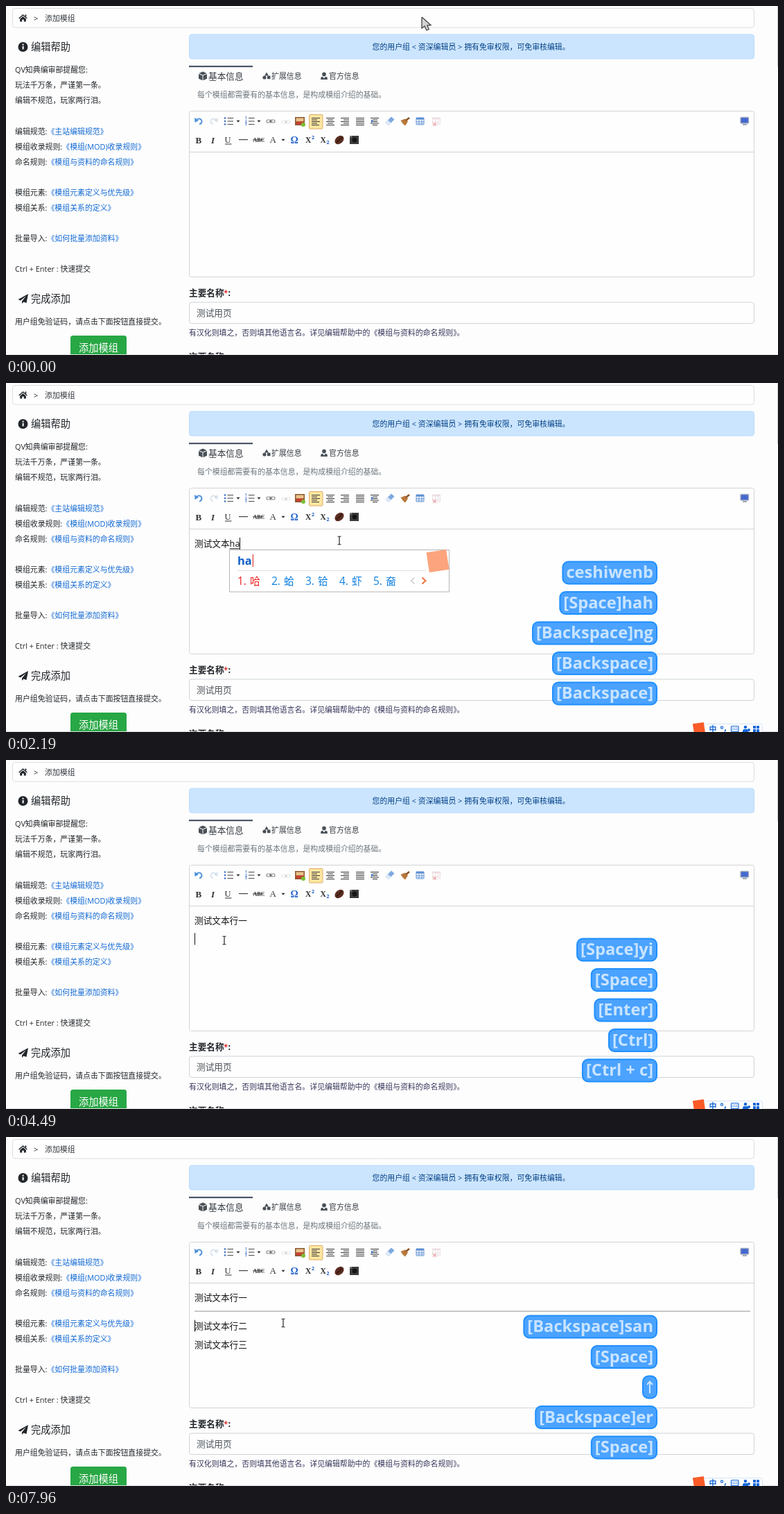
Recreate the animation shown at these times as an HTML page with a canvas. Size 1114 by 503 pixels, loop 8 s.

```html
<!DOCTYPE html>
<html lang="zh-CN">
<head>
<meta charset="utf-8">
<title>添加模组</title>
<style>
html, body { margin: 0; width: 100%; height: 100%; overflow: hidden; background: #fdfdfd; }
canvas { display: block; width: 1114px; height: 503px; }
</style>
</head>
<body>
<canvas id="stage"></canvas>
<script>
const W = 1114, H = 503, LOOP = 8000;
const canvas = document.getElementById('stage');
const g = canvas.getContext('2d');
const dpr = window.devicePixelRatio || 1;
canvas.width = W * dpr;
canvas.height = H * dpr;

const UI = '"Open Sans", "Noto Sans CJK SC", "Noto Sans CJK", sans-serif';
const SERIF = '"Liberation Serif", "Noto Serif", serif';
const MONO = '"Liberation Mono", "DejaVu Sans Mono", monospace';
const SMALL = 10.9, BODY = 12.67, HEAD = 14.25;
const INK = '#212529', LINK = '#1068d4';

/* ---------- drawing helpers ---------- */

// y is the middle of the ideographs
function text(s, x, y, size = SMALL, color = INK, weight = 400, family = UI) {
  g.font = `${weight} ${size}px ${family}`;
  g.fillStyle = color;
  g.fillText(s, x, y + size * 0.38);
  return x + g.measureText(s).width;
}
function box(x, y, w, h, r, fill, stroke, lw = 1) {
  g.beginPath();
  g.roundRect(x, y, w, h, r);
  if (fill) { g.fillStyle = fill; g.fill(); }
  if (stroke) { g.strokeStyle = stroke; g.lineWidth = lw; g.stroke(); }
}
function rect(x, y, w, h, color) {
  g.fillStyle = color;
  g.fillRect(x, y, w, h);
}
function disc(x, y, r, color) {
  g.fillStyle = color;
  g.beginPath();
  g.arc(x, y, r, 0, Math.PI * 2);
  g.fill();
}
function trace(pts, close) {
  g.beginPath();
  for (let i = 0; i < pts.length; i += 2) g.lineTo(pts[i], pts[i + 1]);
  if (close) g.closePath();
}
function poly(x, y, pts, color) {
  trace(pts.map((v, i) => v + (i % 2 ? y : x)), true);
  g.fillStyle = color;
  g.fill();
}
function line(x, y, pts, color, lw = 1) {
  trace(pts.map((v, i) => v + (i % 2 ? y : x)));
  g.strokeStyle = color;
  g.lineWidth = lw;
  g.stroke();
}
function tilted(x, y, size, angle, color) {
  g.save();
  g.translate(x, y);
  g.rotate(angle);
  rect(-size / 2, -size / 2, size, size, color);
  g.restore();
}
function faded(alpha, draw) {
  g.globalAlpha = alpha;
  draw();
  g.globalAlpha = 1;
}

/* ---------- static page ---------- */

function sidebar() {
  disc(24.5, 59, 7, INK);
  rect(23.6, 57.8, 2, 4.6, '#fff');
  rect(23.6, 54.6, 2, 2, '#fff');
  text('编辑帮助', 36, 59, HEAD);
  const rows = [
    ['QV知典编审部提醒您:'], ['玩法千万条，严谨第一条。'], ['编辑不规范，玩家两行泪。'], [],
    ['编辑规范:', '《主站编辑规范》'], ['模组收录规则:', '《模组(MOD)收录规则》'],
    ['命名规则:', '《模组与资料的命名规则》'], [],
    ['模组元素:', '《模组元素定义与优先级》'], ['模组关系:', '《模组关系的定义》'], [],
    ['批量导入:', '《如何批量添加资料》'], [], ['Ctrl + Enter : 快速提交']
  ];
  rows.forEach(([label, link], i) => {
    if (!label) return;
    const y = 92 + i * 22.1, end = text(label, 13, y);
    if (link) text(link, end, y, SMALL, LINK);
  });
  poly(25, 422, [7, -7, -7.5, 1, -4, 2.6, 4, -4, -2, 3.6, -2, 7, 0.4, 4.5, 4.5, 6], INK);
  text('完成添加', 36, 422, HEAD);
  text('用户组免验证码，请点击下面按钮直接提交。', 13, 455);
  box(93, 475, 81, 34, 3.5, '#28a745');
  text('添加模组', 105, 493, HEAD, '#fff');
}

function header() {
  box(9.5, 3.5, 1070, 27.5, 3.5, '#fefefe', '#dcdee0');
  poly(24.5, 17.5, [0, -5.5, 6.3, 0, 5.3, 1, 0, -3.8, -5.3, 1, -6.3, 0], INK);
  poly(24.5, 17.5, [0, -2.6, 4.3, 1.2, 4.3, 5, 1.3, 5, 1.3, 2, -1.3, 2, -1.3, 5, -4.3, 5, -4.3, 1.2], INK);
  rect(27.6, 12.4, 1.7, 3, INK);
  text('>', 40, 17.5);
  text('添加模组', 56, 17.5, SMALL, '#343a40');
  box(264.5, 41, 815, 35, 3.5, '#cce5ff', '#b8daff');
  text('您的用户组 < 资深编辑员 > 拥有免审权限，可免审核编辑。', 528.5, 58.5, SMALL, '#004085');
}

function tabs() {
  const c = '#495057';
  rect(264, 86, 92, 2.2, '#4a5568');
  poly(284, 101, [0, -6.5, 5.6, -4, 0, -1.6, -5.6, -4], c);
  poly(284, 101, [-6, -3, -0.5, -0.7, -0.5, 6.3, -6, 3.8], c);
  poly(284, 101, [6, -3, 0.5, -0.7, 0.5, 6.3, 6, 3.8], c);
  text('基本信息', 292, 101, BODY, '#343a40');
  poly(376, 101, [0, -5.5, 3, -0.5, -3, -0.5], c);
  disc(373, 103, 2.6, c);
  rect(377, 100.6, 4.5, 4.6, c);
  text('扩展信息', 383, 101, SMALL, '#343a40');
  disc(459, 98.4, 2.8, c);
  poly(459, 101, [-5, 5, -4.4, 1.6, -2, 0.8, 0, 3.6, 2, 0.8, 4.4, 1.6, 5, 5], c);
  text('官方信息', 466, 101, SMALL, '#343a40');
  text('每个模组都需要有的基本信息，是构成模组介绍的基础。', 276, 128, SMALL, '#6c757d');
}

function form() {
  text('主要名称', 264, 413, BODY, INK, 700);
  text('*', 314.5, 413, 10, '#e02b2b', 700);
  text(':', 320.5, 413, BODY, INK, 700);
  box(264.5, 427, 815, 30.5, 3.5, '#fefefe', '#ced4da');
  text('测试用页', 275, 442, BODY, '#495057');
  text('有汉化则填之，否则填其他语言名。详见编辑帮助中的《模组与资料的命名规则》。', 264, 471, SMALL, '#34345a');
  text('次要名称:', 264, 505, BODY, INK, 700);
}

/* ---------- toolbar ---------- */

function bars(x, y, widths, align, color = '#444') {
  widths.forEach((w, i) => rect(x - 6 + (12 - w) * align, y - 5 + i * 2.5, w, 1.1, color));
}
function drop(x, y) { poly(x, y, [-2.6, -1.2, 2.6, -1.2, 0, 1.8], '#333'); }

function curl(x, y, flip, color) {
  g.save();
  g.translate(x, y);
  g.scale(flip, 1);
  g.strokeStyle = color;
  g.lineWidth = 2;
  g.beginPath();
  g.arc(0.5, 0.5, 4, Math.PI * 1.15, Math.PI * 2.45);
  g.stroke();
  poly(0, 0, [-6, -5, -5.4, 2, 0, -1], color);
  g.restore();
}
function chain(x, y) {
  box(x - 6, y - 2, 6.5, 4, 2, null, '#8a8a8a', 1.2);
  box(x - 0.5, y - 2, 6.5, 4, 2, null, '#8a8a8a', 1.2);
  rect(x - 2.5, y - 0.5, 5, 1, '#555');
}
function grid(x, y, color) {
  box(x - 5.5, y - 5, 11, 10, 0.5, '#fff', color);
  rect(x - 5.5, y - 5, 11, 2.6, color);
  for (const d of [-2, 2]) rect(x + d, y - 5, 0.9, 10, color);
  for (const d of [0, 2.5]) rect(x - 5.5, y + d, 11, 0.8, color);
}

function toolbar(hover) {
  const y = 166, z = 193, blue = '#3d6fc4';
  curl(278, y, 1, '#4a90dc');
  faded(0.3, () => curl(300, y, -1, '#8ba9c8'));
  for (let i = 0; i < 3; i++) {
    const r = y - 4.5 + i * 4.5;
    disc(316, r, 1.3, blue);
    rect(319.5, r - 0.5, 8.5, 1.1, '#555');
    text(i + 1, 345, r, 4.6, blue, 700);
    rect(350, r - 0.5, 8.5, 1.1, '#555');
  }
  drop(335, y);
  drop(365, y);
  chain(382, y);
  faded(0.2, () => chain(404, y + 1));
  rect(417, 160, 14, 12, '#8a5a35');
  rect(418.5, 161.5, 11, 5, '#e9c48c');
  rect(418.5, 166.5, 11, 4, '#c8412d');
  disc(429, 171, 3, '#7cbd35');
  box(437.5, 156.5, 19.5, 20.5, 1, '#ffe69f', '#dcac6c');
  bars(447, y, [12, 8, 12, 8, 11], 0);
  bars(468, y, [12, 8, 12, 8, 12], 0.5);
  bars(489, y, [12, 8, 12, 8, 12], 1);
  bars(511, y, [12, 12, 12, 12, 12], 0);
  bars(532, y, [12, 7, 7, 12, 7], 0.6);
  poly(527, y, [0, -2.6, 3, 0, 0, 2.6], blue);
  poly(554, y, [2, -6.5, 6.5, -2.5, -2, 6, -6.5, 2], '#7fa9e0');
  poly(554, y, [-3, -1.5, 1.5, 2.6, -2, 6, -6.5, 2], '#dfeaf8');
  poly(576, y, [-6.5, -1, 0, -3.5, 4, 0.5, 0, 6.5, -3, 4], '#b9783c');
  line(576, y, [1, -1, 6, -5], '#8c5427', 2.6);
  grid(597.5, y, '#5d8fd3');
  faded(0.35, () => {
    grid(621, y, '#d8b6bc');
    line(616, y + 2, [0, 0, 5, 5], '#d44', 1.4);
    line(616, y + 2, [5, 0, 0, 5], '#d44', 1.4);
  });
  box(1060, 160.5, 11.5, 8.5, 1, '#4468d0', '#a4abbd', 1.4);
  rect(1063, 170, 6, 2, '#a4abbd');

  if (hover) box(333.5, 183.5, 19, 19.5, 1, '#fff5d4', '#dcac6c');
  text('B', 273.5, z, 13, '#333', 700, SERIF);
  text('I', 296, z, 13, '#333', 'italic 700', SERIF);
  text('U', 315.5, z - 0.5, 12.5, '#333', 400, SERIF);
  rect(316, 198.5, 9.5, 1, '#333');
  rect(336, 192, 13, 1.2, '#444');
  text('ABC', 356.5, z, 8, '#333', 700, SERIF);
  rect(356, 192.4, 16, 1, '#333');
  text('A', 380.5, z - 0.5, 13, '#333', 400, SERIF);
  drop(400, z);
  text('Ω', 410.5, z, 14, '#2563c9', 700, SERIF);
  text('X', 432, z, 11.5, '#333', 700, SERIF);
  text('2', 441, z - 3.5, 7, '#2563c9', 700);
  text('X', 453.5, z, 11.5, '#333', 700, SERIF);
  text('2', 462.5, z + 3.5, 7, '#2563c9', 700);
  g.fillStyle = '#5a2d20';
  g.beginPath();
  g.ellipse(481, z, 7.3, 5.3, -0.7, 0, 7);
  g.fill();
  line(481, z, [-4, 3.5, -1, 1, 1, -1, 4, -4], '#2e140d', 1.3);
  rect(496, 187, 13, 12, '#3b3b3b');
  disc(503, 193, 3.4, '#141414');
  rect(496, 187, 3, 2.5, '#777');
}

/* ---------- typing ---------- */

const BS = '[Backspace]', SP = '[Space]', LINE = '测试文本行一';
const KEYS = [
  [640, 'c'], [690, 'e'], [740, 's'], [790, 'h'], [850, 'i'], [900, 'w'], [950, 'e'], [1000, 'n'], [1050, 'b'],
  [1300, SP], [1500, 'h'], [1680, 'a'], [1740, 'h'], [1830, BS], [1880, 'n'], [1940, 'g'],
  [2010, BS], [2150, BS], [2220, 'clear'], [2290, 'h'], [2490, 'a'], [2540, 'n'], [2590, 'g'],
  [2790, SP], [3010, 'y'], [3060, 'i'], [3420, SP], [3590, '[Enter]'],
  [4230, '[Ctrl]'], [4320, '[Ctrl + c]'], [4540, '[Ctrl]'], [4600, '[Ctrl + v]'], [4800, '[Enter]'],
  [4900, '[Ctrl]'], [5000, '[Ctrl + v]'], [5170, BS], [5250, 's'], [5330, 'a'], [5400, 'n'],
  [5800, SP], [5890, '↑'], [6060, BS], [6110, 'e'], [6170, 'r'], [6360, SP]
];
const WORDS = {
  c: '从 才 吃 草 成', ce: '测 册 侧 策 厕', ces: '测试 测算 册 侧 策', cesh: '测试 侧室 测 册 侧',
  ceshi: '测试 侧室 测时 测 册', ceshiw: '测试我 测试 侧室 测 册', ceshiwe: '测试为 测试 侧室 测 册',
  ceshiwen: '测试文 测试 侧室 测 册', ceshiwenb: '测试文本 测试 侧室 测 册',
  h: '好 和 会 \\(^o^)/~ 后', ha: '哈 蛤 铪 虾 奤', hah: '哈哈 哈 蛤 铪 虾', han: '汉 喊 含 寒 汗',
  hang: '行 航 杭 巷 夯', y: '有 一 也 要 与', yi: '一 已 以 亿 ①',
  s: '是 所 上 说 三', sa: '撒 洒 萨 仨 飒', san: '三 删(shan) 伞 衫 ③',
  e: '额 俄 饿 恶 鹅', er: '二 而 儿 耳 ②'
};

function typed(t) {
  const s = { lines: [''], row: 0, comp: '', chips: [] };
  for (const [at, key] of KEYS) {
    if (at > t) break;
    const letter = /^[a-z]$/.test(key), { lines, row, chips } = s;
    if (letter) {
      s.comp += key;
      if (!chips.length) chips.push('');
      chips[chips.length - 1] += key;
      continue;
    }
    if (key === 'clear') { s.comp = ''; continue; }
    chips.push(key);
    if (key === BS) {
      if (s.comp) s.comp = s.comp.slice(0, -1);
      else lines[row] = lines[row].slice(0, -1);
    } else if (key === SP) {
      lines[row] += WORDS[s.comp].split(' ')[0];
      s.comp = '';
    } else if (key === '[Enter]') {
      lines.push('');
      s.row++;
    } else if (key === '[Ctrl + v]') lines[row] += LINE;
    else if (key === '↑') s.row--;
  }
  s.chips = s.chips.slice(-5);
  return s;
}

function popup(x, cy, comp) {
  const words = WORDS[comp].split(' '), top = cy + 9, row = top + 45;
  const fontOf = w => w[0] === '\\' ? `14px ${MONO}` : `300 15px ${UI}`;
  let end = x + 12;
  const spots = words.map(w => {
    g.font = fontOf(w);
    const at = end;
    end += 18 + g.measureText(w).width + 16;
    return at;
  });
  end -= 16;
  const right = end + 77;
  box(x + 0.5, top + 0.5, right - x - 1, 60.5, 0, '#fff', '#b5b5b5');
  rect(x + 12, top + 30, right - x - 46, 1, '#dedede');
  const caret = text(comp, x + 12, top + 16, 16.5, '#1060c8', 700);
  rect(caret + 1, top + 7, 1.2, 18, '#e23a3a');
  tilted(right - 17, top + 16.5, 29, -0.15, '#fca47d');
  words.forEach((w, i) => {
    const color = i ? '#1080e0' : '#ee1c1c';
    text(`${i + 1}.`, spots[i], row, 15.5, color);
    g.font = fontOf(w);
    g.fillText(w, spots[i] + 18, row + 5.7);
  });
  line(end + 24, row, [2.5, -4.5, -2.5, 0, 2.5, 4.5], '#c9c9c9', 1.4);
  line(end + 40, row, [-2.5, -4.5, 2.5, 0, -2.5, 4.5], '#f4713c', 2);
  if (comp === 'h') {
    g.strokeStyle = '#f08050';
    g.lineWidth = 1;
    g.beginPath();
    g.arc(x + 73.5, top + 15.5, 5, 0, 7);
    g.stroke();
    rect(x + 73, top + 14.5, 1.1, 4, '#f08050');
    rect(x + 73, top + 12, 1.1, 1.4, '#f08050');
    text('6.', x + 83, top + 15, 12.5, '#1080e0');
    text('更多颜文字', x + 97.5, top + 15, 12.5, '#1080e0', 300);
  }
}

function chipStack(chips) {
  chips.forEach((label, i) => {
    const y = 431.5 - (chips.length - 1 - i) * 43.5, up = label === '↑';
    g.font = `700 23.7px ${UI}`;
    const w = up ? 10 : g.measureText(label).width;
    box(934 - w - 5, y, w + 10, 32, 8, '#4ba3ff', '#1f8fff', 2);
    if (up) {
      line(929, y + 16, [0, 9, 0, -8], '#c9e4ff', 2);
      line(929, y + 16, [-4, -3.5, 0, -8, 4, -3.5], '#c9e4ff', 2);
    } else text(label, 934 - w, y + 14.5, 23.7, '#c9e4ff', 700);
  });
}

function imeBar() {
  const c = '#1668d8';
  box(1004.5, 491.5, 87, 16, 2, '#fff', '#d3e4f4');
  tilted(1000, 498, 16, -0.15, '#fa5a28');
  text('中', 1014.5, 498.5, 11, c, 700);
  g.strokeStyle = c;
  g.lineWidth = 1.2;
  g.beginPath();
  g.arc(1033, 496.5, 1.6, 0, 7);
  g.stroke();
  line(1038, 500, [0, -1, 0, 1, -1, 2.5], c, 1.5);
  box(1046.5, 494.5, 10.5, 8, 1, null, c, 1.2);
  for (let i = 0; i < 6; i++) rect(1048.5 + i % 3 * 2.7, 496.5 + (i / 3 | 0) * 2.5, 1.4, 1.3, c);
  disc(1067, 496, 2.3, c);
  poly(1067, 499, [-4.5, 4, -3, 0, 3, 0, 4.5, 4], c);
  disc(1072, 500, 2, c);
  for (let i = 0; i < 4; i++) rect(1078 + i % 2 * 5, 494 + (i >> 1) * 5, 4, 4, c);
}

/* ---------- mouse ---------- */

const PATH = [
  [0, 600, 16], [30, 600, 16], [250, 582, 70], [480, 481, 227], [3640, 481, 227], [3760, 375, 191],
  [3900, 270, 231], [3950, 270, 231], [4150, 350, 231], [4360, 350, 231], [4440, 315, 260],
  [4540, 315, 260], [4760, 384, 278], [6560, 384, 278], [7200, 343, 191], [7450, 343, 191],
  [7800, 400, 268], [LOOP, 400, 268]
];
function mouseAt(t) {
  const i = PATH.findIndex(p => p[0] > t);
  const [t0, x0, y0] = PATH[i - 1], [t1, x1, y1] = PATH[i];
  const k = (t - t0) / (t1 - t0), e = k * k * (3 - 2 * k);
  return [x0 + (x1 - x0) * e, y0 + (y1 - y0) * e];
}
function pointer(x, y) {
  if (x > 264 && y > 210) {
    line(x, y, [-2.5, -5.8, 2.5, -5.8], '#222');
    line(x, y, [0, -5.8, 0, 5.8], '#222', 1.2);
    line(x, y, [-2.5, 5.8, 2.5, 5.8], '#222');
    return;
  }
  const pts = [0, 0, 0, 16, 4, 13, 6.8, 19, 10.2, 17.6, 7.8, 12, 13, 11.5];
  poly(x, y, pts, '#d4d4d4');
  line(x, y, [...pts, 0, 0], '#444', 1.3);
}

/* ---------- frame ---------- */

function editor(t, s) {
  const ruled = t >= 7390;
  const yOf = i => 231.3 + i * 26.6 + (ruled && i ? 14.3 : 0);
  if (t >= 3950 && t < 4440) {
    const end = Math.max(272, Math.min(348, mouseAt(t)[0]));
    rect(272, 223, end - 272, 17, '#3390ff');
  }
  const selected = t >= 4050 && t < 4440;
  s.lines.forEach((l, i) => text(l, 272, yOf(i), BODY, selected && !i ? '#fff' : '#111'));
  if (ruled) rect(272, 250.5, 802, 1.2, '#a6a6a6');
  if (t < 520 || selected) return;

  const y = yOf(s.row);
  g.font = `400 ${BODY}px ${UI}`;
  const start = 272 + (ruled ? 0 : g.measureText(s.lines[s.row]).width);
  let caret = start;
  if (s.comp) {
    caret = text(s.comp, start, y, BODY, '#111');
    rect(start, y + 7, caret - start, 1, '#111');
  }
  rect(Math.round(caret), y - 8.5, 1, 17, '#111');
  if (s.comp) popup(Math.floor(start), Math.round(y), s.comp);
}

const BAR_TIMES = [[520, 700], [1900, 5170], [7600, LOOP]];

function draw(t) {
  const s = typed(t), [mx, my] = mouseAt(t);
  g.setTransform(dpr, 0, 0, dpr, 0, 0);
  rect(0, 0, W, H, '#fdfdfd');
  header();
  sidebar();
  tabs();
  form();
  box(264.5, 151.5, 815, 239, 3, '#fefefe', '#d4d4d4');
  rect(265, 210, 814, 1, '#d4d4d4');
  toolbar(mx > 333 && mx < 353 && my > 183 && my < 203 && t > 6560);
  rect(0, 502, W, 1, '#dcdcdc');
  rect(1113, 0, 1, 88, '#cfcfcf');
  editor(t, s);
  chipStack(s.chips);
  if (BAR_TIMES.some(([a, b]) => t >= a && t < b)) imeBar();
  pointer(mx, my);
}

const began = performance.now();
function tick() {
  draw((performance.now() - began) % LOOP);
  requestAnimationFrame(tick);
}
tick();
</script>
</body>
</html>
```
